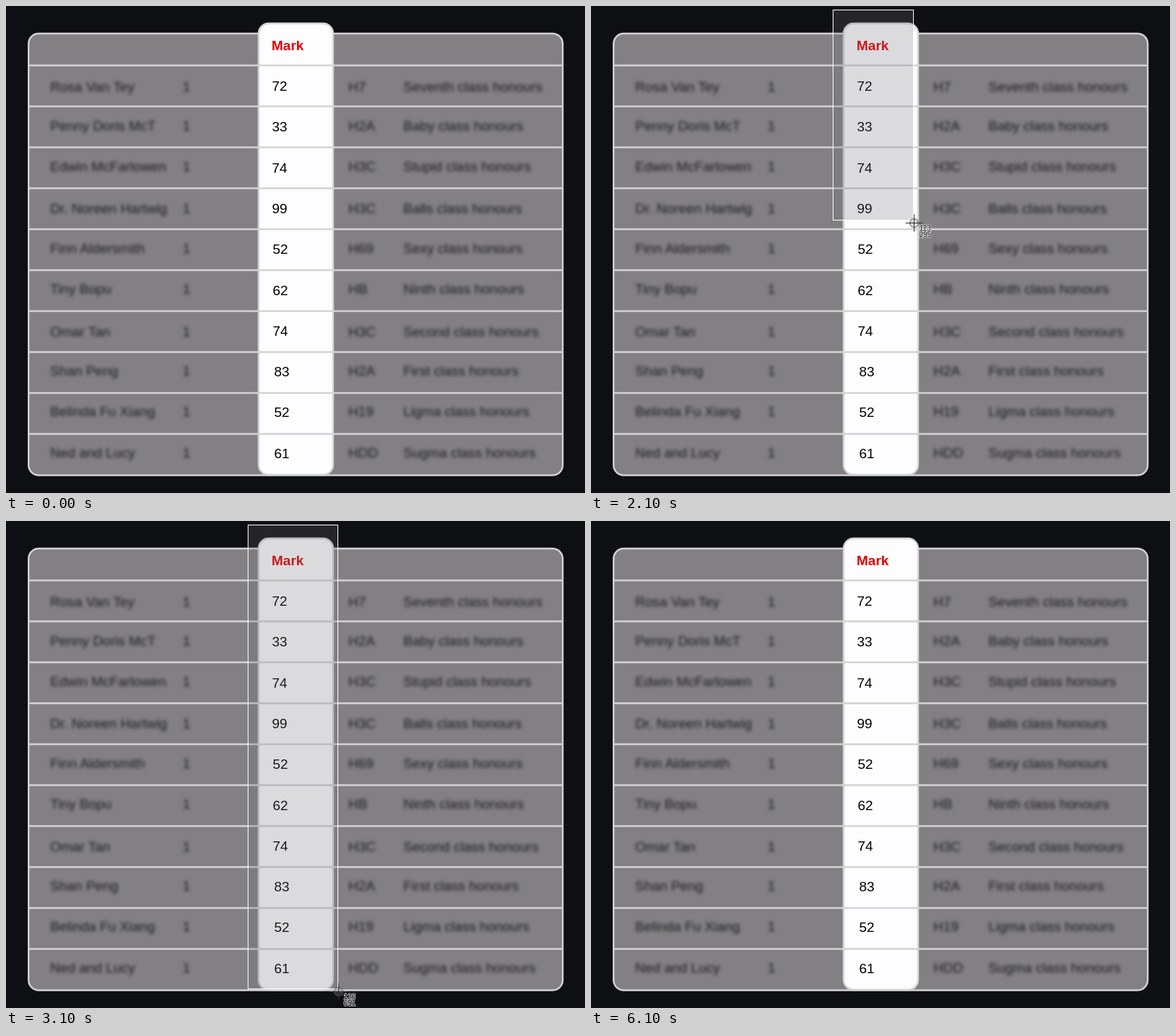
An HTML page that plays this animation: 800x672 px, repeating every 6500 ms.

```html
<!DOCTYPE html>
<html lang="en">
<head>
<meta charset="utf-8">
<title>Marks table</title>
<style>
  html, body { margin: 0; width: 100%; height: 100%; overflow: hidden; background: #0e0f13; }
  svg { display: block; width: 800px; height: 672px; font: 19px "Liberation Sans", Arial, sans-serif; }
  text { white-space: pre; }
  .edge { stroke: #d3d2d6; stroke-width: 2.4; }
  .blur { filter: blur(2.1px); fill: #1c1c1e; }
  .label { font-size: 10px; fill: #111; stroke: #fff; stroke-opacity: .75; stroke-width: 1.6; paint-order: stroke; }
</style>
</head>
<body>
<svg viewBox="0 0 800 672">
  <rect class="edge" x="31.2" y="38" width="738" height="609.5" rx="14" fill="#828082"/>
  <g class="blur" id="faded"></g>
  <rect class="edge" x="349" y="24" width="103" height="623" rx="14" fill="#fdfcff"/>
  <path class="edge" id="lines"/>
  <text x="367" y="61" font-weight="bold" fill="#e30000">Mark</text>
  <g id="marks"></g>
  <rect id="area" x="334.5" y="5.5" fill="#6e6e73" fill-opacity=".24" stroke="#fff"/>
  <g id="cross">
    <circle r="6" fill="#888" fill-opacity=".3" stroke="#555"/>
    <path d="M-12 0H12M0 -12V12" stroke="#333"/>
    <text class="label" x="7" y="10" id="numX"></text>
    <text class="label" x="7" y="19" id="numY"></text>
  </g>
  <path id="arrow" d="M0 0V16.5L3.8 13L6.3 18.8L8.8 17.7L6.3 12H11.5Z" stroke="#fff"/>
</svg>
<script>
const $ = id => document.getElementById(id);
const LOOP = 6500, STEP = 100;
const SCALE = 1.017; // stage pixels to screen points

// name, mark, grade, class, mark x, baseline of the blurred text
const rows = [
  ["Rosa Van Tey", 72, "H7", "Seventh", 367.5, 118],
  ["Penny Doris McT", 33, "H2A", "Baby", 367.5, 172],
  ["Edwin McFarlowen", 74, "H3C", "Stupid", 367.5, 228],
  ["Dr. Noreen Hartwig", 99, "H3C", "Balls", 367.5, 286],
  ["Finn Aldersmith", 52, "H69", "Sexy", 368.5, 341],
  ["Tiny Bopu", 62, "HB", "Ninth", 368.5, 397],
  ["Omar Tan", 74, "H3C", "Second", 368.5, 456],
  ["Shan Peng", 83, "H2A", "First", 370.5, 510],
  ["Belinda Fu Xiang", 52, "H19", "Ligma", 370.5, 566],
  ["Ned and Lucy", 61, "HDD", "Sugma", 370.5, 623]
];

const text = (x, y, s) => `<text x="${x}" y="${y}">${s}</text>`;
$("faded").innerHTML = rows.map(([name, , grade, rank, , y]) =>
  text(61, y, name) + text(244, y, 1) + text(473, y, grade) + text(549, y, rank + " class honours")).join("");
$("marks").innerHTML = rows.map((r, i) => text(r[4], 117 + 56.3 * i, r[1])).join("");
$("lines").setAttribute("d", rows.map((r, i) => `M31 ${82 + 56.5 * i}H769`).join(""));

// time, x, y
const crossPath = [
  [100, 382, 482], [300, 366, 290], [500, 345, 85], [700, 332, 11], [1100, 335, 9], [1300, 335, 9],
  [1400, 343, 24], [1600, 376, 83], [2000, 437, 240], [2100, 446, 299], [2700, 491, 491.5],
  [3100, 459, 649], [3400, 457, 652], [3500, 457, 652], [3800, 461, 652]
];
const arrowPath = [[5000, 563, 660], [5200, 462, 555], [5400, 382, 482]];

function at(path, t) {
  const i = path.findIndex(p => p[0] > t);
  if (i < 0) return path[path.length - 1].slice(1);
  if (i === 0) return path[0].slice(1);
  const [a, b] = [path[i - 1], path[i]];
  const k = (t - a[0]) / (b[0] - a[0]);
  return [a[1] + (b[1] - a[1]) * k, a[2] + (b[2] - a[2]) * k];
}

const show = (id, on) => $(id).style.display = on ? "" : "none";
const place = (id, x, y) => $(id).setAttribute("transform", `translate(${x} ${y})`);

function draw() {
  const t = Math.floor(performance.now() % LOOP / STEP) * STEP;
  const aiming = t >= 100 && t < 4500, dragging = t >= 1400 && t < 4500;
  const [x, y] = at(crossPath, t);
  const w = Math.round(x - 335), h = Math.round(y - 9.5);
  show("cross", aiming);
  show("area", dragging);
  show("arrow", t >= 5000 && t < 6000);
  place("cross", x + .5, y + .5);
  place("arrow", ...at(arrowPath, t));
  if (dragging) {
    $("area").setAttribute("width", w);
    $("area").setAttribute("height", h);
  }
  $("numX").textContent = Math.round(dragging ? w * SCALE : x * SCALE + 80);
  $("numY").textContent = Math.round(dragging ? h * SCALE : y * SCALE + 130);
  requestAnimationFrame(draw);
}
draw();
</script>
</body>
</html>
```
